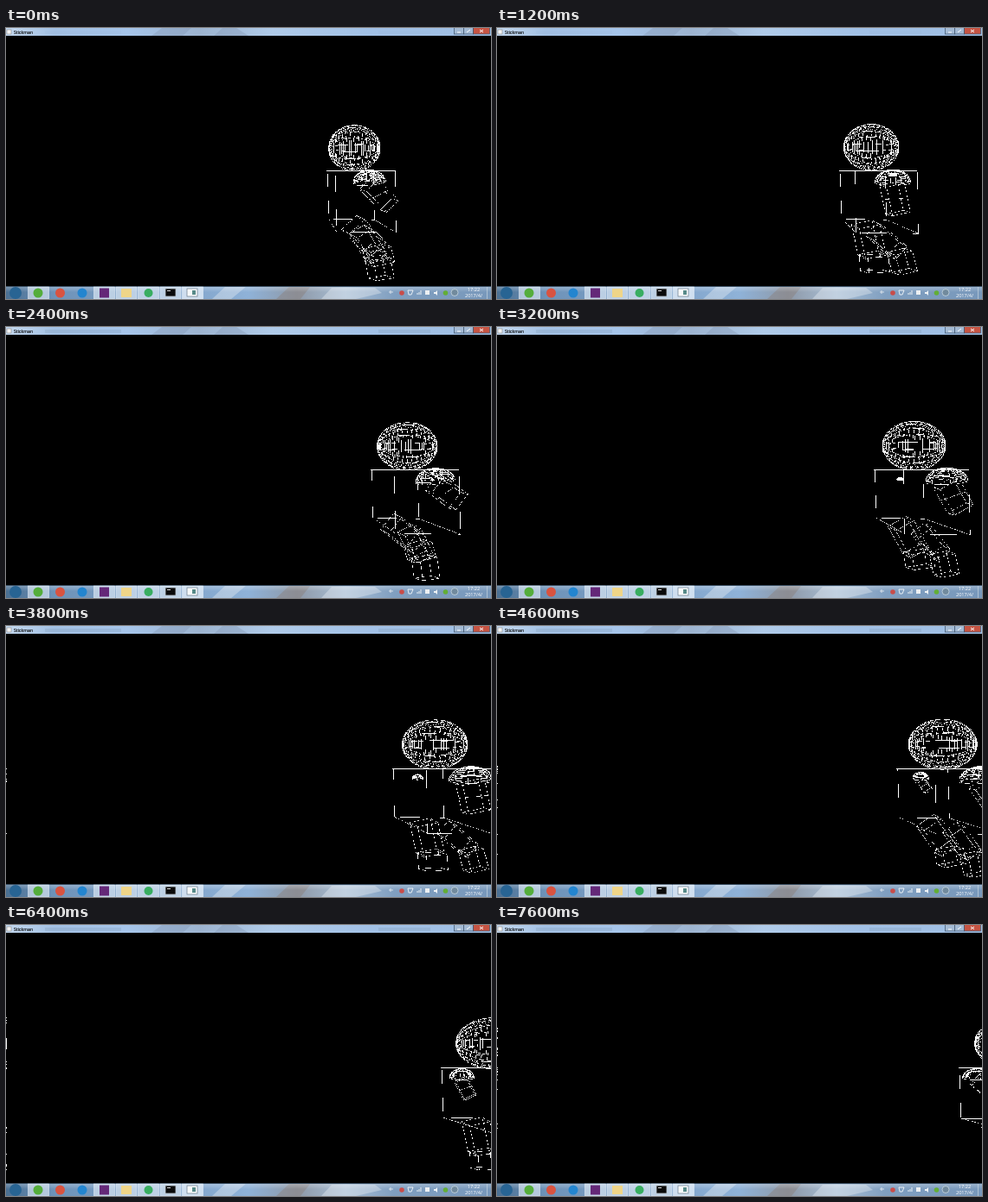
Write an HTML page with a canvas that moves like this. It is 560 px wide and 314 px high and loops after 7.8 s.

```html
<!DOCTYPE html>
<html lang="en">
<head>
<meta charset="utf-8">
<title>Stickman</title>
<style>
html, body { margin: 0; width: 100%; height: 100%; overflow: hidden; background: #000; }
canvas, svg { position: absolute; left: 0; top: 0; width: 560px; height: 314px; }
canvas { image-rendering: pixelated; }
text { font-family: "Open Sans", "Noto Sans", sans-serif; }
</style>
</head>
<body>
<canvas id="stage" width="560" height="314"></canvas>
<svg viewBox="0 0 560 314">
  <defs>
    <linearGradient id="title">
      <stop offset="0" stop-color="#c4d8ee"/><stop offset=".1" stop-color="#a3c1e4"/>
      <stop offset=".25" stop-color="#a6c5ea"/><stop offset=".4" stop-color="#9db4d0"/>
      <stop offset=".55" stop-color="#b0cbe9"/><stop offset=".75" stop-color="#a2c1e6"/>
      <stop offset="1" stop-color="#a0bfe3"/>
    </linearGradient>
    <linearGradient id="bar">
      <stop offset="0" stop-color="#4b7093"/><stop offset=".1" stop-color="#6e93b9"/>
      <stop offset=".35" stop-color="#80a3c9"/><stop offset=".5" stop-color="#8fb2d8"/>
      <stop offset=".6" stop-color="#8e99a8"/><stop offset=".7" stop-color="#a9bfd6"/>
      <stop offset=".8" stop-color="#809fc0"/><stop offset="1" stop-color="#7898bb"/>
    </linearGradient>
    <linearGradient id="shine" x2="0" y2="1">
      <stop offset="0" stop-color="#fff" stop-opacity=".3"/>
      <stop offset="1" stop-color="#fff" stop-opacity="0"/>
    </linearGradient>
  </defs>

  <rect width="560" height="9" fill="url(#title)"/>
  <path d="M168 9l12-9h34l-10 9zM240 9l10-9h16l14 9z" fill="#7e93ae" opacity=".35"/>
  <g id="smudge" fill="#6f86a2">
    <rect x="45" y="3" width="88" height="4"/><rect x="430" y="3" width="60" height="4"/>
  </g>
  <rect x="1" y="2" width="5" height="5" fill="#f4f4f4" stroke="#777" stroke-width=".5"/>
  <text x="9" y="7" font-size="5.2" stroke="#000" stroke-width=".12">Stickman</text>
  <g stroke="#3d526a" stroke-width=".7">
    <rect x="517.5" y="-1" width="11" height="8" fill="#a3bad4"/>
    <rect x="528.5" y="-1" width="11" height="8" fill="#a3bad4"/>
    <rect x="539.5" y="-1" width="19" height="8" fill="#c65443"/>
  </g>
  <path d="M521 5h4M532 5l4-3M547 2l4 3m0-3l-4 3" fill="none" stroke="#fff"/>

  <rect y="299" width="560" height="15" fill="url(#bar)"/>
  <path d="M312 314l16-15h24l-12 15z" fill="#8b7f7a" opacity=".45"/>
  <path d="M238 314l16-15h24l-18 15zM364 314l12-13h50l8 6-30 7z" fill="#e6ebf0" opacity=".4"/>
  <rect y="299" width="560" height="7" fill="url(#shine)"/>
  <path d="M0 299.5h560" stroke="#3c5064"/>
  <g fill="#e9f2fb" fill-opacity=".6" stroke="#eef6fd" stroke-opacity=".7" stroke-width=".7">
    <rect x="25.5" y="300" width="24" height="14"/><rect x="101.5" y="300" width="24" height="14"/>
    <rect x="127" y="300" width="24" height="14"/><rect x="152.5" y="300" width="24" height="14"/>
    <rect x="178" y="300" width="24" height="14"/>
    <rect x="203.5" y="300" width="24" height="14" fill-opacity=".75"/>
  </g>
  <circle cx="11" cy="307" r="7" fill="#286493"/>
  <circle cx="37" cy="307" r="5.5" fill="#54ad3b"/>
  <circle cx="62.5" cy="307" r="5.5" fill="#d95340"/>
  <circle cx="88" cy="307" r="5.5" fill="#2385cf"/>
  <rect x="108" y="301.5" width="11" height="11" fill="#642878"/>
  <rect x="133" y="302" width="12" height="10" fill="#efd588"/>
  <circle cx="164.5" cy="307" r="5" fill="#38ad60"/>
  <rect x="184" y="302" width="12" height="9" fill="#0a0a0a" stroke="#bcc5cd" stroke-width=".8"/>
  <path d="M186 304.5h4" stroke="#ddd"/>
  <rect x="209" y="302" width="12" height="9" fill="#f7f9fa" stroke="#697b8b" stroke-width=".7"/>
  <rect x="215" y="304" width="4" height="5" fill="#588b89"/>

  <path d="M442 306h5M444 304v4" stroke="#e7edf2" stroke-width=".8"/>
  <circle cx="457" cy="307" r="2.8" fill="#c94c48"/>
  <path d="M464 304h6l-2 5h-3z" fill="none" stroke="#fff" stroke-width=".8"/>
  <path d="M475 309v-2m2 2v-3m2 3v-5" stroke="#e9eff4"/>
  <rect x="484" y="304" width="5" height="5" fill="#eceff2"/>
  <path d="M494 306h2l2-2v6l-2-2h-2z" fill="#eef2f5"/>
  <circle cx="507.5" cy="307" r="2.8" fill="#62ae35"/>
  <circle cx="518" cy="306.5" r="4" fill="#718a9d" stroke="#c9dae3" stroke-width=".8"/>
  <g fill="#fff" font-size="5.6" text-anchor="middle">
    <text x="540" y="305">17:22</text><text x="540" y="312">2017/4/</text>
  </g>
  <path d="M555.5 300v14" stroke="#c4d3df" stroke-opacity=".7"/>
</svg>
<script>
const ctx = document.getElementById("stage").getContext("2d");
const smudge = document.getElementById("smudge");
const S = 2.44, LOOP = 7800, STEP = 200;
const times = [0, 1200, 2400, 3800, 5200, 6400, 7600];
let now = -1;

function key(values) {
  let i = 0;
  while (i < 5 && now > times[i + 1]) i++;
  const p = (now - times[i]) / (times[i + 1] - times[i]);
  return values[i] + (values[i + 1] - values[i]) * p;
}

// Nearest-neighbour reduction of a thin line drawn at full screen size.
function line([x1, y1], [x2, y2]) {
  const dx = (x2 - x1) * S, dy = (y2 - y1) * S;
  const n = Math.max(1, Math.ceil(Math.max(Math.abs(dx), Math.abs(dy))));
  for (let i = 0; i <= n; i++) {
    const X = Math.round(x1 * S + dx * i / n), Y = Math.round(y1 * S + dy * i / n);
    const x = Math.floor(X / S), y = Math.floor(Y / S);
    if (x > 560 || y < 9 || y > 298) continue;
    if (Math.floor((x + .5) * S) === X && Math.floor((y + .5) * S) === Y)
      ctx.fillRect(x % 560, y, 1, 1); // the column past the edge wraps round
  }
}

const mid = ([a, b], [c, d]) => [(a + c) / 2, (b + d) / 2];

function prism(front, back) {
  front.forEach((p, i) => {
    const j = (i + 1) % 4;
    line(p, front[j]);
    line(back[i], back[j]);
    line(p, back[i]);
  });
}

// Wire sphere; "end" is the last latitude, "roll" turns its pole in the picture.
function sphere(cx, cy, rx, ry, end, roll, slices, stacks) {
  const tilt = .2, c = Math.cos(roll), s = Math.sin(roll);
  const at = (i, j) => {
    const a = end * i / stacks, b = 2 * Math.PI * j / slices + .15;
    const u = Math.sin(a) * Math.cos(b), z = Math.sin(a) * Math.sin(b);
    const v = -Math.cos(a) * Math.cos(tilt) + z * Math.sin(tilt);
    return [cx + rx * (u * c - v * s), cy + ry * (u * s + v * c)];
  };
  for (let i = 0; i <= stacks; i++)
    for (let j = 0; j < slices; j++) {
      if (i) line(at(i, j), at(i, j + 1));
      if (i < stacks) line(at(i, j), at(i + 1, j));
    }
}

// Draws a box hanging from (x, y) and returns the middle of its far end.
function limb(x, y, angle, len, w, dx, dy) {
  const s = Math.sin(angle), c = Math.cos(angle);
  const at = (u, v) => [x + u * c + v * s, y - u * s + v * c];
  const front = [at(-w, 0), at(w, 0), at(w, len), at(-w, len)];
  prism(front, front.map(([a, b]) => [a + dx, b + dy]));
  return at(0, len);
}

function arm(x, y, angle, len, w, dx, dy) {
  limb(x, y, angle, len, w, dx, dy);
  const s = Math.sin(angle), c = Math.cos(angle), h = len / 2;
  const elbow = [x + h * s, y + h * c];
  line([elbow[0] - w * c + dx, elbow[1] + w * s + dy], [elbow[0] + w * c, elbow[1] - w * s]);
}

function leg(x, y, angle, thigh, shin, w) {
  const knee = limb(x, y, angle, thigh, w, -9, -5);
  limb(knee[0] + 3, knee[1], angle * .3, shin, w, -10, -3);
}

function torso() {
  const top = 165, bx = key([371, 396, 422, 447, 474, 503, 534]);
  const bw = key([53, 52, 53, 57, 59, 61, 63]), by = key([221, 221, 221, 221, 222, 223, 224]);
  const fx = key([380, 413, 448, 485, 521, 561, 602]);
  const fw = key([69, 72, 75, 76, 79, 81, 83]), fy = key([236, 237, 239, 240, 241, 241, 242]);
  const face = (x, w, y) => [[x, top], [x + w, top], [x + w + 1.5, y + 1], [x + 1.5, y]];
  prism(face(fx, fw, fy), face(bx, bw, by));
  ctx.fillRect(Math.round(bx) - 1, top, Math.round(fx + fw - bx) + 1, 1);
}

function draw() {
  ctx.fillStyle = "#000";
  ctx.fillRect(0, 0, 560, 314);
  ctx.fillStyle = "#fff";
  const swing = key([.8, 0, 1, 0, 1, 0, 1]);

  sphere(key([402, 432, 463, 495, 529, 562, 596]), key([139, 138, 138, 137, 137, 137, 137]),
    key([30, 32, 35, 38, 41, 43, 45]), key([27, 27, 28, 29, 30, 30, 30]),
    Math.PI, Math.PI / 2, 20, 20);
  torso();

  const nearX = key([419.5, 457, 496, 537, 578, 620, 662]);
  const nearR = key([19, 21, 23, 26, 28, 30, 32]);
  sphere(nearX, 179, nearR, 15 + (nearR - 19) * .25, Math.PI / 2, -.15 * swing, 20, 10);
  arm(nearX + 3, 182, .2 + .72 * swing, 34, nearR * .5, -8, -2);

  const farX = key([405, 430, 452, 475, 499.5, 526, 554]);
  const farR = key([0, 0, 0, 6.5, 12, 14.5, 17]);
  if (farR > 3) sphere(farX, 177, farR, Math.min(11, farR * .85), Math.PI / 2, 0, 16, 8);
  if (farR > 8) arm(farX, 179, .45 + .4 * swing, farR * 1.6, farR * .5, -2, -1);

  const hip = key([402, 427, 446, 484, 512, 544, 573]);
  const gap = key([12, 14, 24, 29, 33, 40, 45]);
  leg(hip + 3, 230, .2 + .7 * swing, 36, 18, 12);
  leg(hip + gap, 238, .85 - .4 * swing, 34, 24, 10);
}

function tick(ms) {
  const t = Math.floor(ms % LOOP / STEP) * STEP;
  if (t !== now) {
    now = t;
    draw();
    smudge.style.opacity = now < 1400 ? .04 : .2;
  }
  requestAnimationFrame(tick);
}
tick(performance.now());
</script>
</body>
</html>
```
